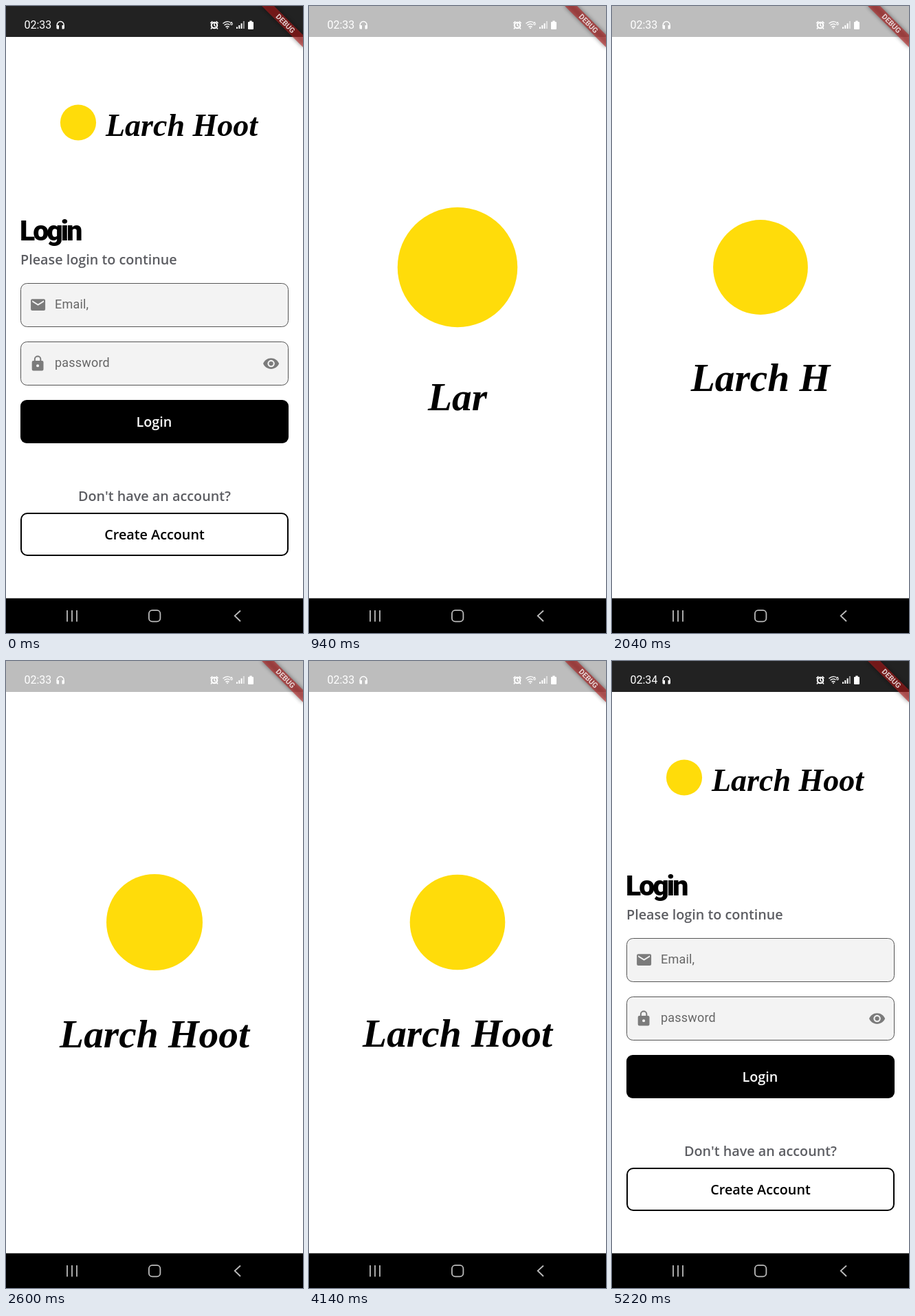
An HTML page for the animation above (5740 ms loop, 432 px wide and 912 px high).

```html
<!DOCTYPE html>
<html lang="en">
<head>
<meta charset="utf-8">
<title>Login flow</title>
<style>
  html, body { margin: 0; height: 100%; overflow: hidden; background: #fff; }
  svg { display: block; width: 100vw; height: 100vh; }
  .brand { font: italic 700 57.4px "Liberation Serif", serif; text-anchor: middle; }
  .small { font-size: 46px; }
  .heading { font: 900 41px Roboto, sans-serif; letter-spacing: -3px; }
  .label { font: 600 19.8px "Open Sans", "Noto Sans", sans-serif; }
  .mid { text-anchor: middle; }
  .muted { fill: #5d5e63; }
  .hint { font: 18px Roboto, sans-serif; letter-spacing: .2px; fill: #666; }
  .field { fill: #f3f3f3; stroke: #555; }
  .icon { fill: #7b7b7b; fill-rule: evenodd; }
  .clock { font: 16px Roboto, sans-serif; }
  .debug { font: 700 10.7px Roboto, sans-serif; text-anchor: middle; fill: #fff; opacity: .78; }
  .line { fill: none; stroke: #fff; stroke-width: 1.5; }
</style>
</head>
<body>
<svg viewBox="0 0 432 912">
  <defs>
    <filter id="blur" x="-50%" y="-100%" width="200%" height="300%"><feGaussianBlur stdDeviation="3"/></filter>
  </defs>

  <g id="splash">
    <rect width="432" height="862" fill="#fff"/>
    <rect width="432" height="45" fill="#bdbdbd"/>
    <text id="typed" class="brand" x="216"></text>
  </g>
  <rect id="scrim" width="432" height="862"/>

  <g id="login">
    <rect width="432" height="862" fill="#fff"/>
    <rect width="432" height="45" fill="#222"/>
    <text id="title" class="brand small" x="255.5" y="189"></text>
    <text class="heading" x="20" y="341">Login</text>
    <text class="label muted" x="21" y="376">Please login to continue</text>

    <rect class="field" x="21.5" y="403.5" width="389" height="63" rx="9"/>
    <path class="icon" transform="translate(34 422) scale(1.05)" d="M20 4H4a2 2 0 0 0-2 2v12a2 2 0 0 0 2 2h16a2 2 0 0 0 2-2V6a2 2 0 0 0-2-2zm0 4l-8 5-8-5V6l8 5 8-5z"/>
    <text class="hint" x="71" y="440">Email,</text>

    <rect class="field" x="21.5" y="488.5" width="389" height="63" rx="9"/>
    <path class="icon" transform="translate(33.5 507.5) scale(1.05)" d="M18 8h-1V6A5 5 0 0 0 7 6v2H6a2 2 0 0 0-2 2v10a2 2 0 0 0 2 2h12a2 2 0 0 0 2-2V10a2 2 0 0 0-2-2zM12 17a2 2 0 1 1 0-4 2 2 0 0 1 0 4zM15.1 8H8.9V6a3.1 3.1 0 0 1 6.2 0z"/>
    <text class="hint" x="71" y="525">password</text>
    <path class="icon" transform="translate(373 507.5) scale(1.05)" d="M12 4.5C7 4.5 2.7 7.6 1 12c1.7 4.4 6 7.5 11 7.5s9.3-3.1 11-7.5C21.3 7.6 17 4.5 12 4.5zM12 17a5 5 0 1 1 0-10 5 5 0 0 1 0 10zM12 9a3 3 0 1 0 0 6 3 3 0 0 0 0-6z"/>

    <rect x="21" y="573" width="390" height="63" rx="9"/>
    <text class="label mid" x="215.5" y="612" fill="#fff">Login</text>
    <text class="label mid muted" x="216" y="720">Don't have an account?</text>
    <rect x="22" y="738" width="388" height="61" rx="9" fill="none" stroke="#000" stroke-width="2"/>
    <text class="label mid" x="216" y="776">Create Account</text>
  </g>

  <circle id="logo" fill="#ffdc0a"/>

  <g id="banner" transform="translate(432 0) rotate(45)">
    <rect x="-42.4" y="29.7" width="84.8" height="12.7" opacity=".45" filter="url(#blur)"/>
    <rect x="-42.4" y="29.7" width="84.8" height="12.7" fill="#b71c1c" opacity=".58"/>
    <text class="debug" y="39.8">DEBUG</text>
  </g>

  <g id="status" fill="#fff">
    <text id="clock" class="clock" x="26.5" y="33"></text>
    <path class="line" d="M74.3 29v-1.5a4.9 4.9 0 0 1 9.8 0V29"/>
    <path d="M73.5 28h3.5v5.5h-2a1.5 1.5 0 0 1-1.5-1.5zM85 28h-3.5v5.5h2A1.5 1.5 0 0 0 85 32z"/>
    <circle class="line" cx="303" cy="28" r="4.2" style="stroke-width:2.2"/>
    <path class="line" d="M303 25v3.4l2 1.2M297.3 25l3-2.7M308.7 25l-3-2.7M299.5 31.5l-1.5 2M306.5 31.5l1.5 2"/>
    <path class="line" d="M315.5 25.5q6-5 11 -1.5M317.5 28q4-3.4 8-.5M319.5 30.5q2.5-2 5 0" style="stroke-width:1.3"/>
    <path d="M320.5 31.5h3L322 33.5z"/>
    <text x="326" y="27.5" style="font:700 7px Roboto,sans-serif">6</text>
    <path d="M335 30.5h2V33h-2zM338.3 28h2v5h-2zM341.6 25.3h2V33h-2z"/>
    <path d="M344.9 22h2v11h-2z" opacity=".55"/>
    <path d="M354.3 21.5h3.4V23h1.3a1 1 0 0 1 1 1v9a1 1 0 0 1-1 1h-6a1 1 0 0 1-1-1v-9a1 1 0 0 1 1-1h1.3z"/>
  </g>

  <g id="nav">
    <rect y="861.5" width="432" height="51"/>
    <path d="M89 879v16.5M96 879v16.5M103 879v16.5M341 879.5l-8.3 7.5 8.3 8" fill="none" stroke="#bbb" stroke-width="1.8"/>
    <rect x="207.9" y="878.9" width="16.5" height="16.5" rx="5" fill="none" stroke="#bbb" stroke-width="1.8"/>
  </g>
</svg>

<script>
const NAME = 'Larch Hoot';
const LOOP = 5740, SPLASH_AT = 280, CLOCK_TICK = 5220;
const BOUNCE = { start: 215, length: 3733 };
const TYPING = { start: 359, step: 249 };
const ROUTE = { start: 4230, length: 373 };
const MARK_RATIO = 0.33;   // circle radius relative to the logo box height
const CENTER = { x: 216, y: 431 };

const $ = id => document.getElementById(id);
const clamp = v => Math.min(1, Math.max(0, v));
const lerp = (a, b, p) => a + (b - a) * p;
const interval = (t, a, b) => clamp((t - a) / (b - a));

function set(id, attrs) {
  for (const key in attrs) $(id).setAttribute(key, attrs[key]);
}

// Height at x on a cubic given by its four x and four y values.
function cubic(x, xs, ys) {
  const at = (v, s) => {
    const r = 1 - s;
    return r * r * r * v[0] + 3 * r * r * s * v[1] + 3 * r * s * s * v[2] + s * s * s * v[3];
  };
  let lo = 0, hi = 1;
  for (let i = 0; i < 24; i++) {
    const s = (lo + hi) / 2;
    if (at(xs, s) < x) lo = s; else hi = s;
  }
  return at(ys, lo);
}

const fastOutSlowIn = t => cubic(t, [0, .4, .2, 1], [0, 0, 1, 1]);

const zoomCurve = t => t < 1 / 6
  ? cubic(t, [0, .05, .1333, .1667], [0, 0, .06, .4])
  : cubic(t, [.1667, .2083, .25, 1], [.4, .82, 1, 1]);

const elasticOut = t => t >= 1 ? 1
  : 1 + 2 ** (-10 * t) * Math.sin((t - .1) * 2 * Math.PI / .4);

const zoom = s =>
  `translate(${CENTER.x} ${CENTER.y}) scale(${s}) translate(${-CENTER.x} ${-CENTER.y})`;

function render(time) {
  const t = time < SPLASH_AT ? 1 : clamp((time - ROUTE.start) / ROUTE.length);
  const height = 210 * Math.max(0, elasticOut(clamp((time - BOUNCE.start) / BOUNCE.length)));
  const grow = zoomCurve(t);

  const count = Math.floor((time - TYPING.start) / TYPING.step) + 1;
  $('typed').textContent = NAME.slice(0, Math.max(0, count));
  set('typed', { y: 456 + height / 2 });
  set('splash', { transform: zoom(lerp(1, 1.05, grow)) });
  set('scrim', { opacity: .6 * interval(t, .2075, .4175) });
  set('login', { transform: zoom(lerp(.85, 1, grow)), opacity: interval(t, .125, .25) });

  // The logo flies on an arc: sideways and shrinking first, upwards later.
  const rise = fastOutSlowIn(t);
  const side = 1 - (1 - rise) ** 1.8;
  set('logo', {
    cx: lerp(216, 105, side),
    cy: lerp(380, 169.5, rise),
    r: MARK_RATIO * lerp(height, 79, side)
  });

  $('clock').textContent = time < CLOCK_TICK ? '02:33' : '02:34';
}

$('title').textContent = NAME;
const begin = performance.now();
function tick() {
  render((performance.now() - begin) % LOOP);
  requestAnimationFrame(tick);
}
tick();
</script>
</body>
</html>
```
